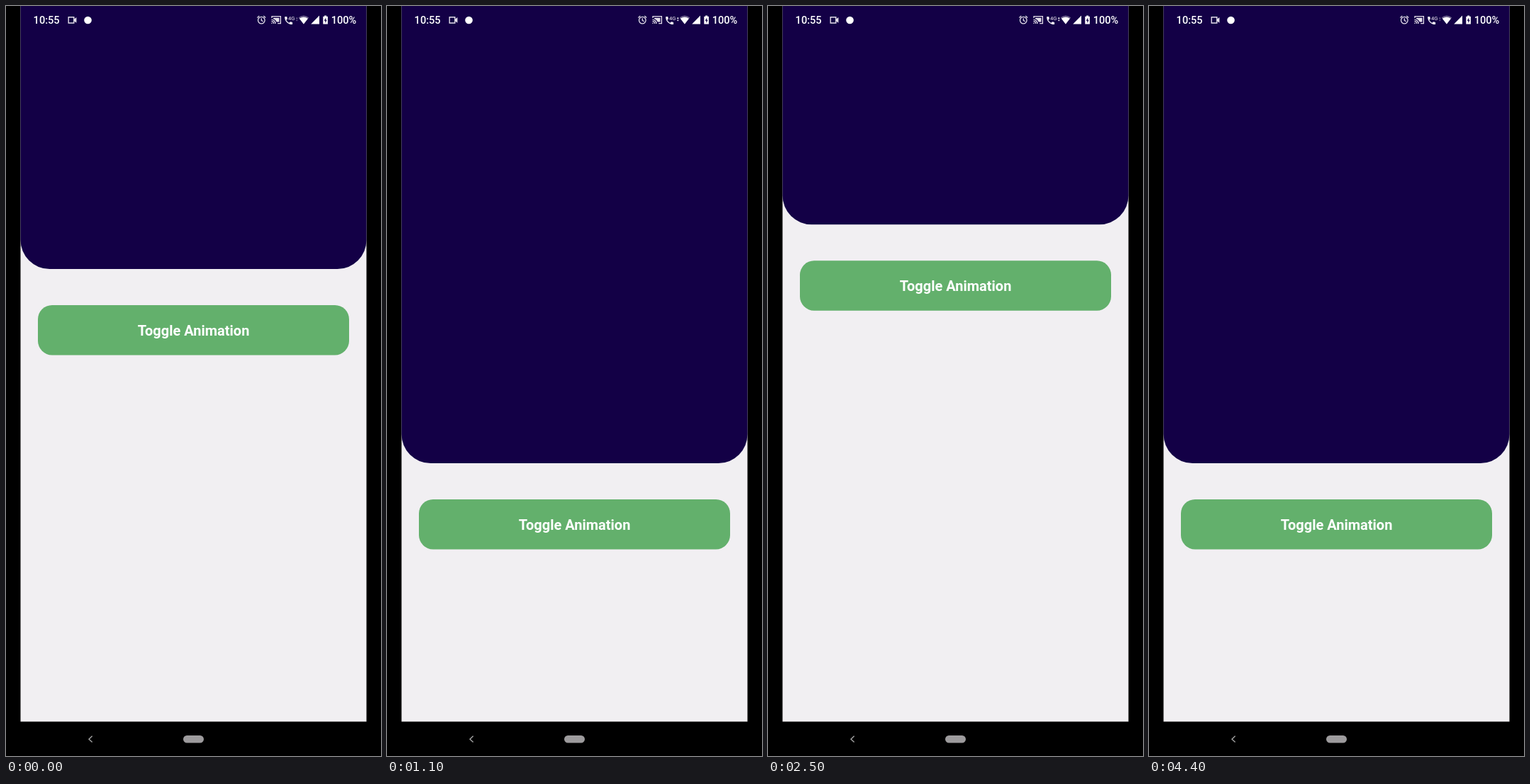
Recreate the animation shown at these times as an HTML page. Size 529x1058 px, loop 6000 ms.

```html
<!DOCTYPE html>
<html lang="en">
<head>
<meta charset="utf-8">
<title>Toggle Animation</title>
<style>
  html, body { margin: 0; width: 100%; height: 100%; overflow: hidden; background: #000; }
  svg { display: block; width: 529px; height: 1058px; }
  text { font-family: Roboto, sans-serif; fill: #fff; }
</style>
</head>
<body>
<svg viewBox="0 0 529 1058">
  <rect width="529" height="1058" fill="#000"/>
  <rect x="20.5" width="488" height="1009.5" fill="#f1eff2"/>
  <path id="header" fill="#130046"/>

  <g id="button">
    <rect x="45" y="51" width="439" height="70.4" rx="20" fill="#63b06c"/>
    <text x="264.5" y="94" font-size="20" font-weight="700" text-anchor="middle">Toggle Animation</text>
  </g>

  <!-- status bar, left -->
  <g font-size="14.6" font-weight="500">
    <text x="38.6" y="25">10:55</text>
    <text x="494.3" y="25" text-anchor="end">100%</text>
  </g>
  <path d="M88.2 15.8h7.6v8.2h-7.6z" fill="none" stroke="#e4e0ea" stroke-width="1.4"/>
  <path d="M96 18.6l3.4-2.6v7.8l-3.4-2.6z" fill="#e4e0ea"/>
  <circle cx="115.5" cy="20" r="5.3" fill="#fff"/>

  <!-- status bar, right -->
  <g fill="none" stroke="#e4e0ea" stroke-width="1.3">
    <circle cx="360.3" cy="20.1" r="4.8"/>
    <path d="M354.4 16.4l2.9-2.4M366.2 16.4l-2.9-2.4M360.3 17.2v3.2l2.3 1.4"/>
    <path d="M375 17v-2.3h12.4v9.9h-4.2M374.5 19.3a5.5 5.5 0 0 1 5.5 5.6M374.5 21.6a3.2 3.2 0 0 1 3.2 3.3"/>
  </g>
  <path d="M377 16.8h8.4v5.8h-3.6q-1.2-3.2-4.8-4.5zM374.4 23.5a1.6 1.6 0 0 1 1.6 1.6h-1.6z" fill="#e4e0ea"/>
  <path transform="translate(391.3 13.2) scale(.61)" fill="#f4f2f7" d="M6.6 10.8c1.4 2.8 3.8 5.1 6.6 6.6l2.2-2.2c.3-.3.7-.4 1-.2 1.1.4 2.3.6 3.6.6.6 0 1 .4 1 1V20c0 .6-.4 1-1 1C10.6 21 3 13.4 3 4c0-.6.4-1 1-1h3.5c.6 0 1 .4 1 1 0 1.2.2 2.4.6 3.6.1.3 0 .7-.3 1z"/>
  <text x="398" y="20" font-size="7.6" font-weight="500" style="fill:#c5bfd2">4G</text>
  <path id="data" d="M408.7 18l1.6-2.2 1.6 2.2zM408.7 19.4h3.2l-1.6 2.2z" fill="#fff"/>
  <path d="M412.6 16.2q7.2-5.3 14.6 0l-7.3 9.3z" fill="#fff" opacity=".38"/>
  <path d="M413.9 17.8q6-3.9 12 0l-6 7.7z" fill="#fff"/>
  <path d="M442 13.6v11.8h-11.8z" fill="#fff"/>
  <path d="M447.3 14.8h1.8v-1.4h3v1.4h1.8v10.8h-6.6z" fill="#fff"/>
  <path d="M451.3 16.6l-2.6 4.2h1.6v3.2l2.4-4.3h-1.4z" fill="#130046"/>

  <!-- navigation bar -->
  <path d="M121.6 1029.8l-4.6 4.4 4.6 4.4" fill="none" stroke="#a3a3a3" stroke-width="1.4"/>
  <rect x="250" y="1029" width="29" height="10.4" rx="5.2" fill="#9d9b9d"/>
</svg>
<script>
const LOOP = 6000, STEP = 100;
const header = document.getElementById('header');
const button = document.getElementById('button');
const data = document.getElementById('data');

// [time, value] keys
const edge = [
  [0, 371], [300, 506], [600, 626], [700, 642], [800, 645],
  [1700, 645], [1800, 616.2], [2200, 425], [2400, 323], [2500, 308.3],
  [3500, 308.3], [3600, 331], [3900, 479.3], [4200, 622], [4300, 640], [4400, 645]
];
const fade = [
  [1500, 1], [1600, .75], [1700, .4], [1800, .8], [1900, 1],
  [3200, 1], [3300, .85], [3400, .3], [3500, .55], [3600, .93], [3700, 1]
];

const slope = (a, b) => (b[1] - a[1]) / (b[0] - a[0]);

// Tangent that never overshoots its neighbours
function tangent(keys, i) {
  if (i === 0 || i === keys.length - 1) return 0;
  const a = slope(keys[i - 1], keys[i]), b = slope(keys[i], keys[i + 1]);
  return a * b > 0 ? 2 * a * b / (a + b) : 0;
}

function sample(keys, t) {
  if (t <= keys[0][0]) return keys[0][1];
  const i = keys.findIndex(k => k[0] >= t);
  if (i < 0) return keys[keys.length - 1][1];
  const [t0, v0] = keys[i - 1], [t1, v1] = keys[i];
  const d = t1 - t0, u = (t - t0) / d, w = 1 - u;
  return v0 * w * w * (1 + 2 * u) + v1 * u * u * (3 - 2 * u)
    + d * u * w * (w * tangent(keys, i - 1) - u * tangent(keys, i));
}

function draw(time) {
  const t = Math.floor((time % LOOP) / STEP) * STEP;
  const y = sample(edge, t), r = 41;
  header.setAttribute('d',
    `M20.5 0H508.5V${y - r}a${r} ${r} 0 0 1 ${-r} ${r}H${20.5 + r}a${r} ${r} 0 0 1 ${-r} ${-r}z`);
  button.setAttribute('transform', `translate(0 ${y})`);
  button.setAttribute('opacity', sample(fade, t));
  data.setAttribute('opacity', t >= 1100 && t < 3100 ? .95 : .35);
}

const start = performance.now();
function tick() {
  draw(performance.now() - start);
  requestAnimationFrame(tick);
}
tick();
</script>
</body>
</html>
```
